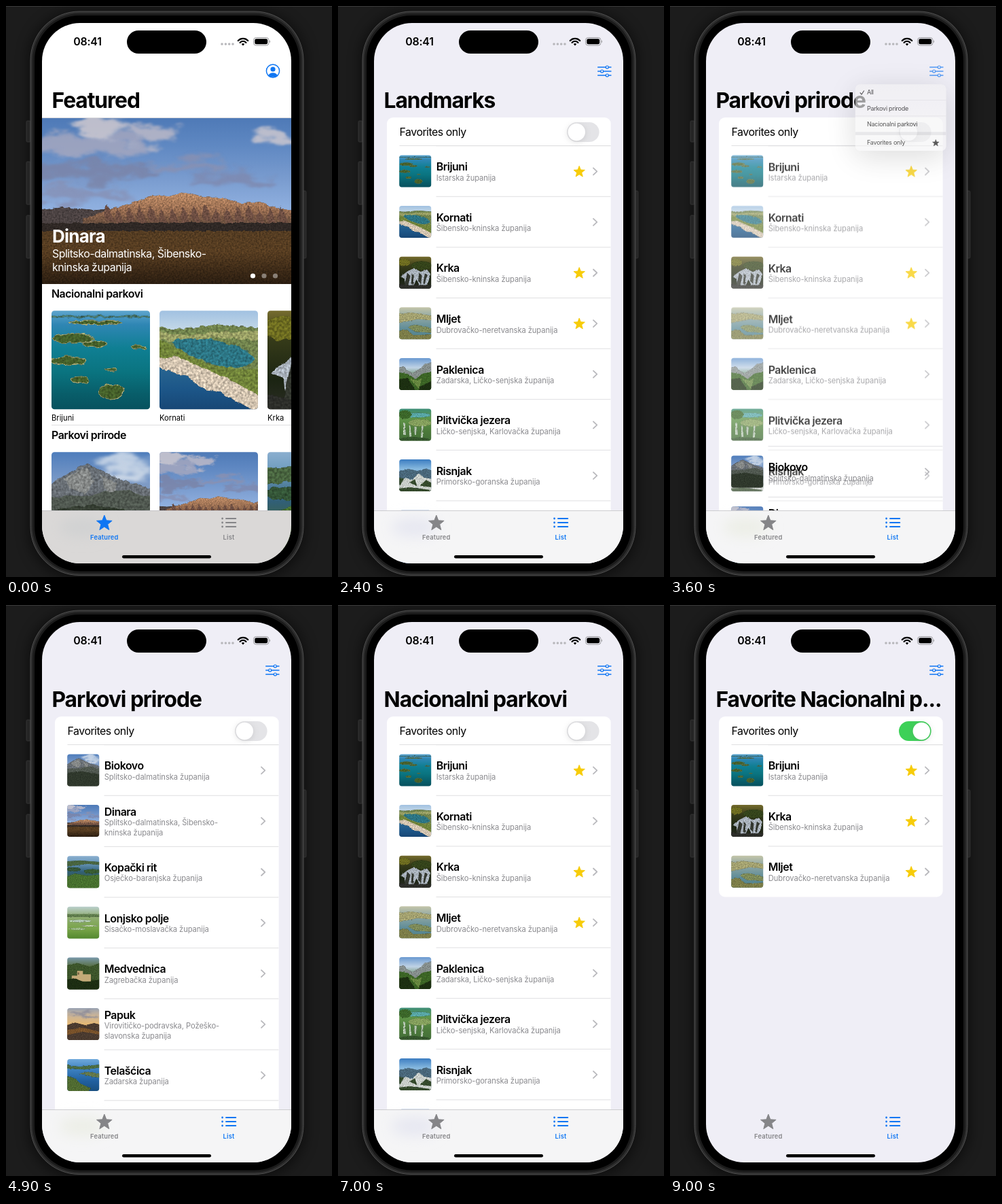
Recreate the animation shown at these times as an HTML page. Size 480x840 px, loop 9.6 s.

```html
<!DOCTYPE html>
<html lang="hr">
<head>
<meta charset="utf-8">
<title>Landmarks</title>
<style>
  html, body { margin: 0; width: 100%; height: 100%; overflow: hidden; background: #1c1c1c; }
  svg { display: block; width: 100vw; height: 100vh; font-family: Inter, "Noto Sans", sans-serif; font-optical-sizing: none; }
  .title { font-size: 31.75px; font-weight: 700; letter-spacing: -1.05px; }
  .hero { font-size: 26px; font-weight: 700; letter-spacing: -.75px; }
  .body { font-size: 15.9px; letter-spacing: -.47px; }
  .head { font-size: 15.9px; font-weight: 600; letter-spacing: -.45px; }
  .clock { font-size: 15.9px; font-weight: 600; letter-spacing: -.2px; }
  .small { font-size: 11.2px; }
  .sub { font-size: 11.2px; letter-spacing: -.08px; fill: #8a8a8e; }
  .tab { font-size: 9.3px; font-weight: 600; letter-spacing: .2px; text-anchor: middle; }
</style>
</head>
<body>
<svg id="stage" viewBox="0 0 480 840"></svg>
<script>
const LOOP = 9600, STEP = 100, ROW = 74.6, LIST_TOP = 205.7;
const BLUE = '#0f76f3', GRAY = '#858588', YELLOW = '#f7cc08';

// SVG helpers
const text = (x, y, cls, str, more = '') => `<text x="${x}" y="${y}" class="${cls}" ${more}>${str}</text>`;
const rect = (x, y, w, h, fill, r = 0, more = '') =>
  `<rect x="${x}" y="${y}" width="${w}" height="${h}" rx="${r}" fill="${fill}" ${more}/>`;
const oval = (fill, x, y, rx, ry = rx, more = '') =>
  `<ellipse cx="${x}" cy="${y}" rx="${rx}" ry="${ry}" fill="${fill}" ${more}/>`;
const shape = (fill, d) => `<path fill="${fill}" d="${d}"/>`;
const line = (d, color, width = 1) =>
  `<path d="${d}" fill="none" stroke="${color}" stroke-width="${width}" stroke-linecap="round" stroke-linejoin="round"/>`;
const star = (x, y, r, fill) => {
  const points = Array.from({ length: 10 }, (_, i) => {
    const a = i * Math.PI / 5, d = i % 2 ? r * .43 : r;
    return `${(x + d * Math.sin(a)).toFixed(2)},${(y - d * Math.cos(a)).toFixed(2)}`;
  });
  return `<polygon points="${points}" fill="${fill}" stroke="${fill}" stroke-linejoin="round"/>`;
};

let gradients = '', gradientCount = 0;
const gradient = (...colors) => {
  const id = 'g' + gradientCount++;
  const stops = colors.map((c, i) => `<stop offset="${i / (colors.length - 1)}" stop-color="${c}"/>`);
  gradients += `<linearGradient id="${id}" x2="0" y2="1">${stops.join('')}</linearGradient>`;
  return `url(#${id})`;
};
const backdrop = (...colors) => rect(-10, -10, 120, 120, gradient(...colors));
const rough = content => `<g filter="url(#rough)">${content}</g>`;
const cloud = (c, x, y, rx, ry) => oval(c, x, y, rx, ry, 'opacity=".8" filter="url(#wisp)"');
const island = (x, y, rx, ry) => oval('#45602a', x, y, rx, ry, 'stroke="#a9a878" stroke-width=".8"');

// Landscapes, each on a 100 x 100 field unless noted
const dinaraWide = rect(-10, -10, 390, 150, gradient('#4a76b4', '#5f88c2', '#7a9ccf', '#93b3e2')) +
  cloud('#a9a9bf', 70, 40, 85, 16) + cloud('#d9cfd1', 90, 14, 36, 13) + cloud('#c3bdc8', 160, 22, 40, 13) +
  cloud('#d4ccd0', 340, 28, 32, 12) + cloud('#7b83a6', 70, 80, 100, 15) + cloud('#8a90b0', 215, 70, 60, 8) +
  cloud('#7e88ae', 280, 88, 62, 9) + cloud('#8790b4', 60, 112, 80, 9) +
  rough(shape('#4b4242', 'M-10 136L30 131 80 135 150 128 380 140V175H-10Z') +
    shape(gradient('#c08d66', '#946a4f', '#43362f'),
      'M60 148L97 135 137 123 162 113 187 115 209 109 237 116 267 117 292 125 322 123 347 133 380 137V167H60Z') +
    Array.from({ length: 17 }, (_, i) => {
      const x = 95 + i * 16, y = 126 + (i * 7) % 9;
      return shape('#6d4e42', `M${x} ${y}l6 10 5 16-10-1-5-9Z`);
    }).join('')) +
  rough(rect(-10, 154, 390, 18, '#2f2825') + rect(-10, 166, 390, 90, gradient('#543c22', '#573d21', '#3a2816', '#21160d')));

const photos = {
  brijuni: backdrop('#7fbbe0', '#2f86b4', '#0f7f93', '#0a7480', '#085c68', '#064a58') +
    rough(rect(-5, 5, 110, 2, '#446f62') + island(45, 12, 27, 2) + island(22, 28, 21, 5) + island(44, 34, 13, 3) +
      island(17, 51, 18, 4.5) + island(29, 70, 9, 3.5) + island(60, 82, 13, 7.5) + island(61, 60, 6, 1.5) + island(88, 37, 8, 1.5)),
  kornati: backdrop('#8fb5de', '#c5d9e8', '#2c6a94', '#1c5688', '#153f6c') +
    rough(shape('#71834d', 'M-10 17L20 18 60 14 110 18V98L70 80 35 60-10 50Z') +
      shape('#9aa065', 'M-10 21L30 25 55 22 110 20V31L60 27 15 31-10 27Z') +
      shape('#2c7584', 'M12 31Q38 24 69 33 101 42 95 53 72 63 45 50 22 43 12 31Z') +
      shape('#71843a', 'M-10 26L12 34 30 46 55 55 85 60 110 57V92L72 73 38 58-10 48Z') +
      shape('#d3c4b0', 'M-10 48L20 47 44 58 72 70 110 91V107L84 96 62 82 45 81 27 66-10 54Z')),
  krka: backdrop('#8a7c34', '#353a19', '#1b2412', '#30302a') +
    rough(oval('#6d6c20', 15, 18, 20, 12) + oval('#34431a', 70, 28, 32, 14) +
      shape('#aab3bd', 'M4 62L25 46 46 36 67 47 87 40 98 54 92 78 82 94 66 96 54 72 45 92 20 97 16 70Z') +
      shape('#33372f', 'M25 51l10 9-7 30-13 4ZM40 52l6 8-3 28-6-4ZM62 50l9 9-3 26-9-9ZM80 52l7 4-7 30-5-4Z') +
      shape('#2c2d29', 'M-10 84l36 6 30-2 54 2v25H-10Z')),
  mljet: backdrop('#d5cfaa', '#8fa7a4', '#5d8b97', '#4e7d83') +
    rough(shape('#a3a16f', 'M-10 22L35 16 110 27V42L60 37-10 51Z') +
      shape('#7d8a58', 'M25 62Q46 50 71 58T105 66V80L50 77Z') +
      shape('#7c7d48', 'M-10 74L25 70 44 87 110 84V110H-10Z')),
  paklenica: backdrop('#4c85c9', '#bfd2e5', '#436e2a', '#1c3516') +
    rough(shape('#858e8c', 'M-10 32L13 26 26 39 42 47 66 32 80 18 110 14V75H-10Z') +
      shape('#3b6425', 'M-10 43L28 50 51 66 72 49 110 40V110H-10Z') +
      shape('#1c2f11', 'M-10 68L25 62 58 110H-10ZM62 90L110 68V110H60Z') + shape('#66863f', 'M33 65l23 5 15-7-9 34Z')),
  plitvice: backdrop('#318b87', '#609549', '#4b793a', '#416b39') +
    rough(oval('#58a6a6', 56, 20, 42, 8) + oval('#3b6629', 18, 18, 20, 14) + oval('#85a05d', 65, 44, 36, 12) +
      shape('#b2c4ae', 'M12 45l7 0 2 37-9 0ZM30 52l5 0 4 36-8 0ZM47 55l8 2-2 25-6 0ZM70 53l6 0-2 38-7 0Z') +
      oval('#34552c', 45, 99, 55, 10)),
  risnjak: backdrop('#2369b7', '#87b9df', '#5c7794', '#1f3526') +
    rough(shape('#49677a', 'M-10 40L30 29 56 36 85 28 110 38V80H-10Z') +
      shape('#c9cec9', 'M-10 73L20 57 38 65 61 44 79 57 110 62V102L55 89-10 100Z') +
      shape('#34492b', 'M-10 55l25 5-13 22ZM31 72l18-10 7 22ZM65 82l19-18 26 14V88ZM-10 92l45-5 75 10v13H-10Z')),
  biokovo: backdrop('#3f73b8', '#7b9ac7', '#9aa3ad', '#4c5344') + cloud('#dce4ed', 80, 15, 27, 8) +
    rough(shape('#686e74', 'M-10 39L14 22 36 12 55 21 73 29 110 39V75H-10Z') +
      shape('#868988', 'M12 27L35 15 43 29 35 42 20 37ZM49 23l18 8-7 18Z') +
      shape('#505850', 'M-10 46L33 44 72 38 110 47V110H-10Z') + shape('#2f382c', 'M-10 60L42 53 110 64V110H-10Z')),
  dinara: `<g transform="scale(.41) translate(-61.5 0)">${dinaraWide}</g>`,
  kopacki: backdrop('#99b8d8', '#6d9bbd', '#315f77', '#40642f', '#2b4d20') +
    rough(shape('#48643f', 'M-10 17L40 14 110 19V29L65 25-10 34Z') + oval('#345537', 20, 42, 22, 7) +
      oval('#385b32', 80, 48, 28, 7) + shape('#47702e', 'M-10 67L25 55 62 62 110 58V110H-10Z')),
  lonjsko: backdrop('#c8dbe9', '#91ad75', '#78a448', '#477f27') +
    rough(rect(-10, 23, 120, 9, '#5f7d4c') + oval('#b9cfbd', 40, 45, 35, 4) + oval('#c3d2b2', 70, 60, 29, 2) +
      oval('#9ab886', 30, 70, 27, 4)),
  medvednica: backdrop('#86a8d0', '#566d3e', '#2c431d', '#17220e') +
    rough(shape('#3c552a', 'M-10 27L30 17 70 29 110 15V70H-10Z')) +
    shape('#c3aa78', 'M14 57h17V42h18v11h25v22H14Z') + rect(33, 47, 4, 7, '#6c5738') +
    rough(shape('#1c2d12', 'M-10 71L22 65 55 78 110 69V110H-10Z')),
  papuk: backdrop('#8199bd', '#c6b39c', '#e4b875', '#583b25', '#2c1e14') + cloud('#8c8b99', 52, 21, 43, 7) +
    rough(shape('#4a3a2f', 'M-10 55L25 45 56 53 84 47 110 53V110H-10Z') +
      shape('#79522a', 'M-10 70L48 61 110 76V84L48 74-10 86Z')),
  telascica: backdrop('#80b6e4', '#3e82c1', '#205f9e', '#164a77') +
    rough(shape('#4b6b42', 'M-10 17L38 23 110 16V26L54 33-10 29Z') + shape('#64784a', 'M35 45L67 39 110 47V60L79 55Z') +
      shape('#506b31', 'M-10 50L22 59 44 78 75 91 60 110H-10Z'))
};
const photo = (name, x, y, size) =>
  `<g transform="translate(${x} ${y}) scale(${size / 100})" clip-path="url(#${size > 60 ? 'tile' : 'thumb'})"><use href="#${name}"/></g>`;

// List contents: name, photo, region line(s), favourite
const place = (name, image, region, favorite) => ({ name, image, region: region.split('|'), favorite });
const national = [
  place('Brijuni', 'brijuni', 'Istarska županija', true),
  place('Kornati', 'kornati', 'Šibensko-kninska županija'),
  place('Krka', 'krka', 'Šibensko-kninska županija', true),
  place('Mljet', 'mljet', 'Dubrovačko-neretvanska županija', true),
  place('Paklenica', 'paklenica', 'Zadarska, Ličko-senjska županija'),
  place('Plitvička jezera', 'plitvice', 'Ličko-senjska, Karlovačka županija'),
  place('Risnjak', 'risnjak', 'Primorsko-goranska županija'),
  place('Sjeverni Velebit', 'biokovo', 'Ličko-senjska županija')
];
const nature = [
  place('Biokovo', 'biokovo', 'Splitsko-dalmatinska županija'),
  place('Dinara', 'dinara', 'Splitsko-dalmatinska, Šibensko-|kninska županija'),
  place('Kopački rit', 'kopacki', 'Osječko-baranjska županija'),
  place('Lonjsko polje', 'lonjsko', 'Sisačko-moslavačka županija'),
  place('Medvednica', 'medvednica', 'Zagrebačka županija'),
  place('Papuk', 'papuk', 'Virovitičko-podravska, Požeško-|slavonska županija'),
  place('Telašćica', 'telascica', 'Zadarska županija'),
  place('Učka', 'mljet', 'Istarska županija')
];
const places = [...national, ...nature];
const layout = rows => {
  let y = LIST_TOP;
  const tops = new Map();
  for (const row of rows) {
    tops.set(row, y);
    y += ROW + (row.region.length > 1 ? .5 : 0);
  }
  return { tops, bottom: y };
};
const views = [
  { at: 0, title: 'Landmarks', rows: places, tint: '#e6e7f1' },
  { at: 3500, title: 'Parkovi prirode', rows: nature, tint: '#eceee6' },
  { at: 5900, title: 'Nacionalni parkovi', rows: national, tint: '#e6e7f1' },
  { at: 7700, title: 'Favorite Nacionalni p...', rows: national.filter(p => p.favorite), tint: '#e6e7f1' }
].map(view => ({ ...view, ...layout(view.rows) }));
const menus = [
  { open: 2400, duration: 600, close: 3500, choice: 0 },
  { open: 4900, duration: 500, close: 5900, choice: 1 }
];

const rowMarkup = ({ name, image, region, favorite }) => {
  const shift = region.length > 1 ? -7 : 0;
  return `<g class="row">${rect(144.5, -.5, 257, 1, '#dfdfe1')}${photo(image, 90.2, 13.8, 47)}` +
    text(144.7, 36.5 + shift, 'head', name) +
    region.map((part, i) => text(144.7, 51 + shift + i * 14.7, 'sub', part)).join('') +
    (favorite ? star(355.2, 38.3, 8.6, YELLOW) : '') + line('M376 32.6l5.3 5-5.3 5', '#b9b9bd', 1.8) + '</g>';
};
const wifiArc = r => line(`M${349 - r * .72} ${58 - r * .7}A${r} ${r} 0 0 1 ${349 + r * .72} ${58 - r * .7}`, '#000', 2.3);

const phone = rect(0, 0, 480, 1, '#393939') + rect(34, 10, 406, 830, '#000', 68, 'opacity=".55" filter="url(#soft)"') +
  [[30, 169, 31], [30, 229, 63], [30, 308, 63], [436, 272, 99]].map(([x, y, h]) =>
    rect(x, y, 6, h, '#252525', 1.5, 'stroke="#3d3d3d" stroke-width=".7"')).join('') +
  rect(36, 8, 402, 829.5, '#2d2d2d', 72, 'stroke="#505050"') + rect(39, 11, 396, 823.5, '#1b1b1b', 69) +
  rect(42, 14, 390, 817.5, '#000', 66);

const status = text(120, 58, 'clock', '08:41', 'text-anchor="middle"') + rect(178, 36, 117, 34, '#000', 17) +
  [318, 323.4, 328.7, 334].map(x => oval('#b7b7bb', x, 56, 1.8)).join('') +
  wifiArc(10) + wifiArc(6) + shape('#000', 'M346.7 55.8Q349 54 351.3 55.8L349 58.4Z') +
  rect(364.5, 46.5, 22.5, 11.5, 'none', 3.8, 'stroke="#98989b"') + rect(366.2, 48.2, 19, 8.1, '#000', 2.4) +
  shape('#98989b', 'M388.2 50.3q2 2 0 4Z');

const featured = rect(53, 25, 367, 795, '#fff') +
  `<g stroke="${BLUE}" stroke-width="1.5">${oval('none', 393, 95.6, 9.6)}</g>` + oval(BLUE, 393, 93, 3.6) +
  shape(BLUE, 'M386.4 102Q388 98.2 393 98.2T399.6 102Q397 104.6 393 104.6T386.4 102Z') +
  text(67.5, 150, 'title', 'Featured') + rect(53, 164, 367, 1, '#d8d8dc') +
  `<g transform="translate(53 165)" clip-path="url(#hero)">${dinaraWide}</g>` +
  `<g fill="#fff">${text(68, 348, 'hero', 'Dinara')}${text(68, 370, 'body', 'Splitsko-dalmatinska, Šibensko-')}` +
  `${text(68, 390, 'body', 'kninska županija')}</g>` +
  [363.5, 380, 396.5].map((x, i) => oval('#fff', x, 397, 3.6, 3.6, `opacity="${i ? .42 : 1}"`)).join('') +
  [['Nacionalni parkovi', 429, ['brijuni', 'kornati', 'krka']], ['Parkovi prirode', 637, ['biokovo', 'dinara', 'kopacki']]]
    .map(([title, y, images]) => text(67, y, 'head', title) +
      images.map((image, i) => photo(image, 67 + i * 159, y + 19.3, 145)).join('')).join('') +
  ['Brijuni', 'Kornati', 'Krka'].map((name, i) => text(67 + i * 159, 610, 'small', name)).join('') +
  rect(67, 616, 353, 1, '#dedee0');

const list = rect(53, 25, 367, 795, '#efeef6') +
  `<g id="sliders">${[[90, 396.3], [96, 388.7], [102, 396.3]].map(([y, x]) =>
    line(`M382.7 ${y}H${x - 2.2}M${x + 2.2} ${y}H402`, BLUE, 1.4) +
    oval('none', x, y, 2, 2, `stroke="${BLUE}" stroke-width="1.2"`)).join('')}</g>` +
  text(67.5, 150, 'title', '', 'id="heading"') + rect(72, 164, 329.7, 100, '#fff', 9, 'id="card"') +
  `<g clip-path="url(#rows)">${places.map(rowMarkup).join('')}</g>` + rect(90.5, 205, 311, 1, '#dfdfe1') +
  text(90.5, 191, 'body', 'Favorites only') + rect(337, 171, 47.6, 29, '#e4e4e7', 14.5, 'id="track"') +
  `<g id="knob">${oval('#777', 351.3, 187, 12.6, 12.6, 'opacity=".25" filter="url(#mist)"')}${oval('#fff', 351.3, 185.5, 12.7)}</g>`;

const tabs = `<g id="bar">${rect(53, 742, 367, 78, '#f4f4f5', 0, 'id="barFill"')}` +
  `${oval('#fff', 112, 767, 34, 14, 'id="barTint" filter="url(#soft)"')}${rect(53, 742, 367, .7, '#bcbcc0')}</g>` +
  `<g id="featuredTab">${star(144.8, 761, 11.9, 'currentColor')}` +
  `${text(144.8, 784.5, 'tab', 'Featured', 'fill="currentColor"')}</g>` +
  `<g id="listTab">${[754, 760, 766].map(y => oval('currentColor', 318.6, y, 1.4) +
    line(`M324 ${y}H338.3`, 'currentColor', 1.9)).join('')}${text(328, 784.5, 'tab', 'List', 'fill="currentColor"')}</g>` +
  rect(171, 808, 131, 4.6, '#000', 2.3);

const menu = `<g id="menu">${rect(179, 132, 234, 171, '#000', 12, 'opacity=".22" filter="url(#shadow)"')}` +
  rect(179, 117, 234, 171, gradient('#f0f0f2', '#f4f4f5', '#f5f5f6'), 12) +
  rect(179, 157, 234, 1, '#d3d3d6') + rect(179, 198, 234, 1, '#d3d3d6') + rect(179, 239.5, 234, 8, '#dcdcdf') +
  ['All', 'Parkovi prirode', 'Nacionalni parkovi'].map((label, i) => text(209, 143 + i * 41, 'body', label)).join('') +
  text(209, 273, 'body', 'Favorites only') + star(386.3, 268, 8.8, '#000') +
  `<g id="check">${line('M191.8 138.5l3.4 4.4 6.2-9.2', '#000', 1.8)}</g></g>`;

const blur = (id, amount) =>
  `<filter id="${id}" x="-100%" y="-100%" width="300%" height="300%"><feGaussianBlur stdDeviation="${amount}"/></filter>`;
const clip = (id, box) => `<clipPath id="${id}">${box}</clipPath>`;
const stage = document.getElementById('stage');
stage.innerHTML = `<defs>${gradients}${blur('mist', 5)}${blur('soft', 10)}${blur('shadow', 40)}
  <filter id="wisp" x="-50%" y="-150%" width="200%" height="400%" color-interpolation-filters="sRGB">
    <feGaussianBlur in="SourceGraphic" stdDeviation="3" result="puff"/>
    <feTurbulence type="fractalNoise" baseFrequency=".02 .05" numOctaves="4" seed="8"/>
    <feDisplacementMap in="puff" scale="45" xChannelSelector="R" yChannelSelector="G"/>
    <feGaussianBlur stdDeviation="1"/>
  </filter>
  <filter id="rough" color-interpolation-filters="sRGB">
    <feTurbulence type="fractalNoise" baseFrequency=".12" numOctaves="3" seed="4"/>
    <feDisplacementMap in="SourceGraphic" scale="5" xChannelSelector="R" yChannelSelector="G" result="land"/>
    <feTurbulence type="fractalNoise" baseFrequency=".4" numOctaves="2" seed="9"/>
    <feColorMatrix values="1 0 0 0 0 1 0 0 0 0 1 0 0 0 0 0 0 0 0 1"/>
    <feComposite in2="land" operator="arithmetic" k1=".8" k2="0" k3=".6" k4="0"/>
    <feComposite in2="land" operator="in"/>
  </filter>
  ${clip('screen', rect(53, 25, 367, 795, '#000', 56))}${clip('hero', rect(0, 0, 367, 244, '#000'))}
  ${clip('tile', rect(0, 0, 100, 100, '#000', 3))}${clip('thumb', rect(0, 0, 100, 100, '#000', 8))}
  ${clip('rows', rect(72, 164, 329.7, 100, '#000', 9, 'id="cardClip"'))}
  ${Object.entries(photos).map(([name, art]) => `<g id="${name}">${art}</g>`).join('')}</defs>
  ${phone}<g clip-path="url(#screen)"><g id="featured">${featured}</g><g id="list">${list}</g>${status}${tabs}${menu}</g>`;

const el = id => document.getElementById(id);
const rowElements = [...stage.querySelectorAll('.row')];
const set = (node, attributes) => {
  for (const name in attributes) node.setAttribute(name, attributes[name]);
};
const clamp = v => Math.min(1, Math.max(0, v));
const mix = (a, b, k) => a + (b - a) * k;
const easeInOut = v => v * v * (3 - 2 * v);
const show = (node, visible) => set(node, { display: visible ? 'inline' : 'none' });

function menuLevel({ open, duration, close }, t) {
  if (t < open) return 0;
  if (t < close) return 1 - (1 - clamp((t - open) / duration)) ** 3;
  return (1 - clamp((t - close + STEP) / 500)) ** 1.5;
}

function renderMenu(t) {
  const current = menus.findLast(m => t >= m.open) || menus[0];
  const level = menuLevel(current, t), scale = mix(.2, 1, level);
  show(el('menu'), level > 0);
  set(el('menu'), {
    transform: `translate(398 113) scale(${scale}) translate(-398 -113)`,
    opacity: clamp(level * 1.4)
  });
  set(el('check'), { transform: `translate(0 ${current.choice * 41})` });
  set(el('sliders'), { opacity: 1 - .65 * level });
}

function renderList(t) {
  const index = views.findLastIndex(v => t >= v.at);
  const to = views[index], from = views[Math.max(0, index - 1)];
  const k = easeInOut(clamp((t - to.at + STEP) / 600));
  const favoritesOnly = index === 3 ? k : 0;
  el('heading').textContent = to.title;
  places.forEach((row, i) => {
    const a = from.tops.get(row), b = to.tops.get(row);
    const opacity = mix(a === undefined ? 0 : 1, b === undefined ? 0 : 1, k);
    show(rowElements[i], opacity > 0);
    set(rowElements[i], { transform: `translate(0 ${mix(a ?? b ?? 0, b ?? a ?? 0, k)})`, opacity });
  });
  const height = mix(from.bottom, to.bottom, k) - 164;
  set(el('card'), { height });
  set(el('cardClip'), { height });
  set(el('knob'), { transform: `translate(${19 * favoritesOnly} 0)` });
  set(el('track'), { fill: `rgb(${mix(228, 61, favoritesOnly)},${mix(228, 209, favoritesOnly)},${mix(231, 88, favoritesOnly)})` });
  set(el('bar'), { opacity: 1 - favoritesOnly });
  set(el('barTint'), { fill: to.tint });
}

function render(t) {
  const home = t < 400;
  show(el('featured'), home);
  show(el('list'), !home);
  renderList(t);
  renderMenu(t);
  set(el('barFill'), { fill: home ? '#dad8d7' : '#f5f5f6' });
  if (home) set(el('barTint'), { fill: '#d0d1d2' });
  set(el('featuredTab'), { color: home ? BLUE : GRAY });
  set(el('listTab'), { color: home ? GRAY : BLUE });
}

let shown = -1;
function tick() {
  const t = Math.floor(performance.now() % LOOP / STEP) * STEP;
  if (t !== shown) render(shown = t);
  requestAnimationFrame(tick);
}
tick();
</script>
</body>
</html>
```
